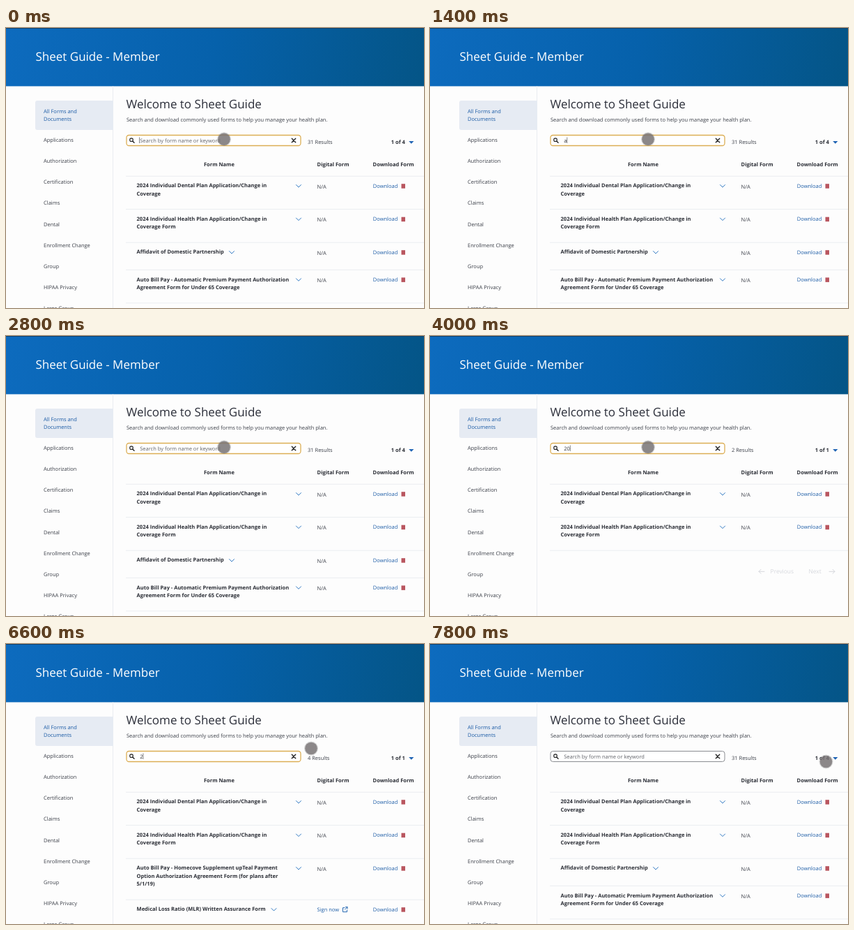
Animation of 600 by 401 pixels, one loop 8 s. Source, as an HTML page:

```html
<!DOCTYPE html>
<html lang="en">
<head>
<meta charset="utf-8">
<title>Sheet Guide</title>
<style>
  html, body { margin: 0; width: 100%; height: 100%; overflow: hidden; background: #fdfdfd; }
  svg { display: block; width: 100%; height: 100%; }
  text { font: 7.5px "Open Sans", "Noto Sans", sans-serif; fill: #3b3f48; text-rendering: geometricPrecision; }
  .title { font-size: 17px; fill: #fff; }
  .h1 { font-size: 17px; fill: #2c2f3a; }
  .bold { font-weight: 700; fill: #2a2d35; }
  .link { fill: #1c5ca6; }
  .hint { fill: #606268; }
  .typed { fill: #33353c; }
  .empty { font-size: 15px; fill: #33363f; }
  .pager { font-size: 8.4px; fill: #d6d8dd; }
  .rule { stroke: #ebedf1; }
  .line { fill: none; stroke-linecap: round; stroke-linejoin: round; }
</style>
</head>
<body>
<svg viewBox="0 0 600 401" preserveAspectRatio="none">
  <defs>
    <linearGradient id="banner" gradientUnits="userSpaceOnUse" x1="0" y1="0" x2="590" y2="115">
      <stop offset="0" stop-color="#0d6bbe"/>
      <stop offset=".5" stop-color="#0661ab"/>
      <stop offset="1" stop-color="#045587"/>
    </linearGradient>
  </defs>
  <rect width="600" height="401" fill="#fdfdfd"/>
  <rect width="600" height="83.4" fill="url(#banner)"/>
  <rect width="600" height="1" fill="#12406a"/>
  <text class="title" x="42.5" y="47">Sheet Guide - Member</text>

  <path class="rule" d="M153.5 83.4V401"/>
  <path fill="#e6ebf3" d="M154 104V146H45a3 3 0 0 1-3-3V107a3 3 0 0 1 3-3z"/>
  <g id="menu">
    <text class="link" x="54" y="121.6">All Forms and</text>
    <text class="link" x="54" y="132.8">Documents</text>
  </g>

  <text class="h1" x="172.5" y="114.5">Welcome to Sheet Guide</text>
  <text x="173" y="133.6">Search and download commonly used forms to help you manage your health plan.</text>

  <rect id="field" x="173" y="153.5" width="250" height="15" rx="3.5" fill="#fff"/>
  <g class="line" stroke="#222">
    <circle cx="180" cy="160.2" r="2.3" stroke-width="1.1"/>
    <path d="M182 162.2L184 164.2" stroke-width="1.4"/>
    <path d="M410.3 158.3l5.4 5.4m0-5.4l-5.4 5.4" stroke-width="1.4"/>
  </g>
  <text id="query" x="192.2" y="163.5"></text>
  <rect id="caret" y="156.500" width=".7" height="8.500" fill="#555"/>

  <text id="count" x="433" y="165.6"></text>
  <text id="pages" class="bold" x="552.8" y="165.6"></text>
  <path fill="#2064b4" d="M578.2 162h7.2l-3.6 3.8z"/>

  <g id="table">
    <text class="bold" x="284" y="197.6">Form Name</text>
    <text class="bold" x="446.6" y="197.6">Digital Form</text>
    <text class="bold" x="526.6" y="197.6">Download Form</text>
    <path class="rule" d="M172 212.2H600"/>
  </g>
  <g id="full"></g>
  <g id="four"></g>
  <g id="two">
    <g class="line" stroke="#d6d8dd">
      <path d="M480 337.3h-8m3-3l-3 3 3 3M573 337.3h8m-3-3l3 3-3 3"/>
    </g>
    <text class="pager" x="488.6" y="340.4">Previous</text>
    <text class="pager" x="543.5" y="340.4">Next</text>
  </g>
  <g id="none">
    <path fill="#e6ebf3" d="M395 209c9 0 14 6 14 14 0 7-3 11-5 15 1 5 19 5 20 15v13H372V244c8-2 14-2 14-6-3-4-5-8-5-15 0-8 5-14 14-14z"/>
    <g class="line" stroke="#4c8ace" stroke-width="1.1">
      <path fill="#fff" d="M354 227.5h37c4 0 5 3 5 7V276H361V236h-12v-3c0-4 2-5.5 5-5.5z"/>
      <path d="M354 227.5c5 0 7 4 7 8.5"/>
      <path stroke="#a9c6e6" stroke-width=".9" d="M367 240.5h23m-23 7h23m-23 7h23m-23 7h14m-14 7h12"/>
      <path stroke-width="3.6" d="M402.5 276.5l7 6"/>
      <path stroke="#fff" stroke-width="1.8" d="M402.5 276.5l7 6"/>
      <circle cx="393.5" cy="269" r="10.5" fill="#fff"/>
    </g>
    <circle cx="393.5" cy="269" r="8" fill="#1261ad"/>
    <g class="line" stroke="#b9d8f2" stroke-width=".8">
      <path d="M388 270a5.5 5.5 0 0 1 11 0M390 273v-3a3.5 3.5 0 0 1 7 0v3M392.3 274.5v-4.5a1.3 1.3 0 0 1 2.5 0v4.5"/>
    </g>
    <text class="empty" x="265.3" y="318.4">No documents match your search.</text>
  </g>

  <g id="pointer">
    <circle r="10" fill="#777" opacity=".3"/>
    <circle r="8.8" fill="#777273" opacity=".78"/>
  </g>
</svg>
<script>
const $ = id => document.getElementById(id);
const add = (parent, markup) => parent.insertAdjacentHTML('beforeend', markup);
const label = (cls, x, y, text) => `<text class="${cls}" x="${x}" y="${y}">${text}</text>`;

['Applications', 'Authorization', 'Certification', 'Claims', 'Dental',
  'Enrollment Change', 'Group', 'HIPAA Privacy', 'Large Group']
  .forEach((item, i) => add($('menu'), label('', 54, 163.1 + 30.1 * i, item)));

const dental = { lines: ['2024 Individual Dental Plan Application/Change in', 'Coverage'] };
const health = { lines: ['2024 Individual Health Plan Application/Change in', 'Coverage Form'] };
const affidavit = { lines: ['Affidavit of Domestic Partnership'], arrow: 324 };
const autoPay = { lines: ['Auto Bill Pay - Automatic Premium Payment Authorization', 'Agreement Form for Under 65 Coverage'] };
const supplement = { lines: ['Auto Bill Pay - Homecove Supplement upTeal Payment', 'Option Authorization Agreement Form (for plans after', '5/1/19)'] };
const lossRatio = { lines: ['Medical Loss Ratio (MLR) Written Assurance Form'], arrow: 384.5, sign: true };

const rowHeights = [0, 39.2, 47.5, 59];

function addRows(group, rows) {
  let top = 212.2;
  for (const { lines, arrow = 420, sign } of rows) {
    const mid = top + 14;
    lines.forEach((text, i) => add(group, label('bold', 187.6, top + 16.1 + 11.3 * i, text)));
    add(group, `<path class="line" stroke="#2f78c2" d="M${arrow - 3.5} ${mid - 1.6}l3.5 3.5 3.5-3.5"/>`);
    add(group, sign
      ? label('link', 446.6, top + 16.7, 'Sign now') +
        `<path class="line" stroke="#2468b2" d="M486 ${mid - 2.5}h-2.5v6h6v-2.5m-3-1l3.5-3.5m-2.5 0h2.5v2.5"/>`
      : label('', 446.6, top + 17.3, 'N/A'));
    add(group, label('link', 526.8, top + 16.6, 'Download'));
    add(group, `<rect x="567.5" y="${mid - 3}" width="5.5" height="6.5" fill="#b9565f"/>`);
    top += rowHeights[lines.length];
    add(group, `<path class="rule" d="M172 ${top}H600"/>`);
  }
}
addRows($('full'), [dental, health, affidavit, autoPay]);
addRows($('four'), [dental, health, supplement, lossRatio]);
addRows($('two'), [dental, health]);

const totals = { full: [31, 4], four: [4, 1], two: [2, 1], none: [0, 1] };

// start time, query, result list, caret shown
const typing = [
  [0, '', 'full', true], [400, '', 'full', false], [800, '', 'full', true],
  [1400, 'a', 'full', true], [1600, 'as', 'four', true], [1800, 'asd', 'none', true],
  [2000, 'asdf', 'none', true], [2200, 'asdf', 'none', false],
  [2400, 'as', 'four', true], [2600, '', 'full', true], [2800, '', 'full', false],
  [3400, '2', 'four', true], [4000, '20', 'two', true], [4200, '202', 'two', true],
  [4600, '2024', 'two', true], [5000, '2024', 'two', false], [5200, '2024', 'two', true],
  [6000, '202', 'two', true], [6200, '20', 'two', true], [6400, '2', 'four', true],
  [7200, '', 'full', false]
];
// start time, pointer x, y
const moves = [
  [0, 313, 159.3], [6400, 372, 155], [6600, 438, 149.5], [6800, 424, 153],
  [7000, 413, 160], [7400, 448, 160], [7600, 530, 165], [7800, 568.5, 168.5]
];
const BLUR_TIME = 7400, LOOP = 8000;
const current = (steps, t) => steps.findLast(step => step[0] <= t);

function render(t) {
  const [, query, list, caret] = current(typing, t);
  const [, x, y] = current(moves, t);
  const [count, pages] = totals[list];
  const focused = t < BLUR_TIME;

  for (const id in totals) $(id).style.display = id === list ? '' : 'none';
  $('table').style.display = list === 'none' ? 'none' : '';
  $('count').textContent = `${count} Results`;
  $('pages').textContent = `1 of ${pages}`;
  $('query').textContent = query || 'Search by form name or keyword';
  $('query').setAttribute('class', query ? 'typed' : 'hint');
  $('caret').style.display = caret ? '' : 'none';
  $('caret').setAttribute('x', 191.3 + (query ? $('query').getComputedTextLength() + 1 : 0));
  $('field').setAttribute('stroke', focused ? '#dcae55' : '#8b8d92');
  $('field').setAttribute('stroke-width', focused ? 1.3 : 1);
  $('pointer').setAttribute('transform', `translate(${x} ${y})`);
}

const start = performance.now();
function tick() {
  render((performance.now() - start) % LOOP);
  requestAnimationFrame(tick);
}
tick();
</script>
</body>
</html>
```
